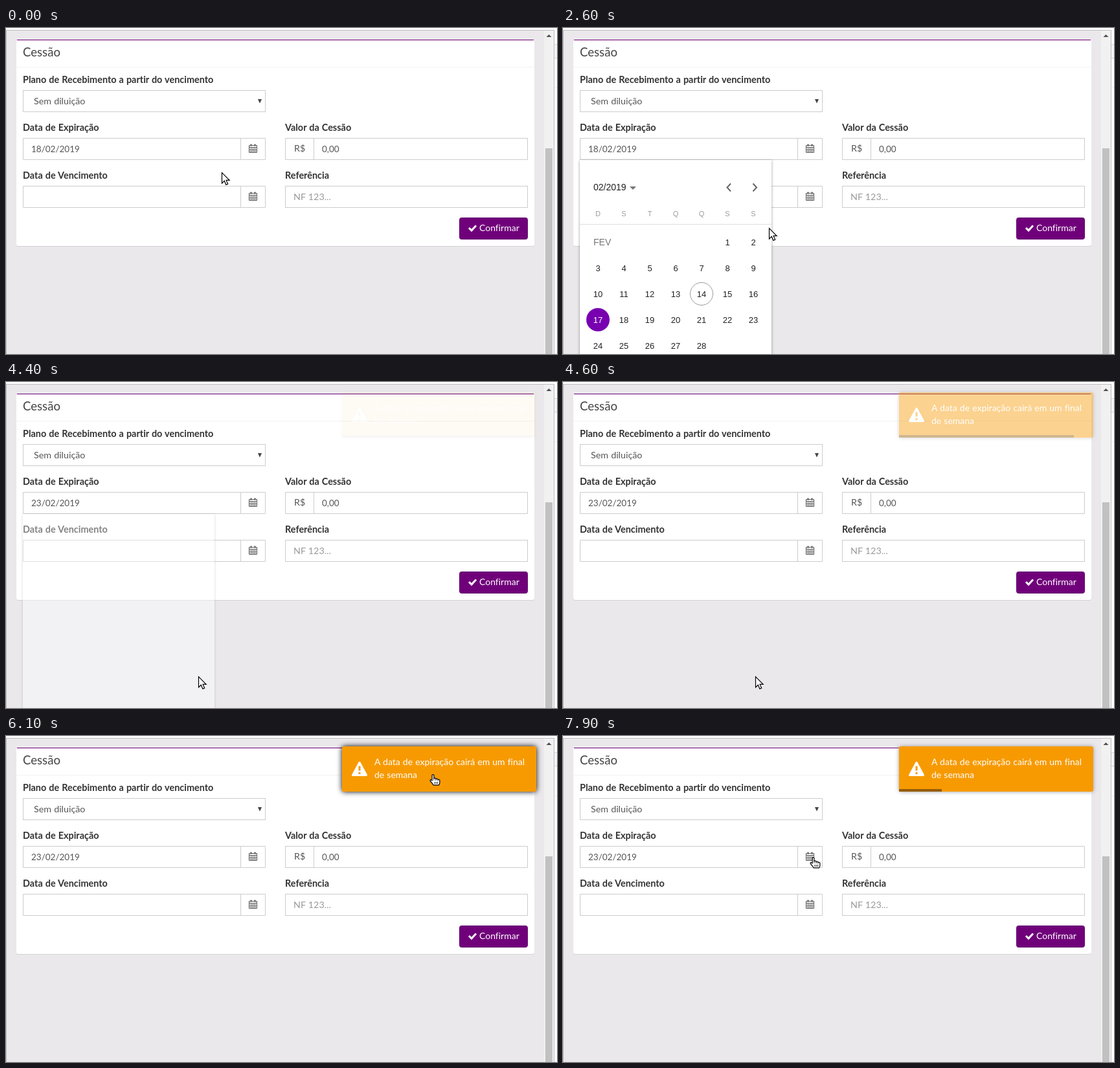
Animation, 851 px wide and 504 px high, one loop 8 s. Source, as an HTML page:

```html
<!DOCTYPE html>
<html lang="pt-BR">
<head>
<meta charset="utf-8">
<title>Cessão</title>
<style>
  html, body { margin: 0; width: 100%; height: 100%; overflow: hidden; background: #fff; }
  #stage { position: relative; width: 851px; height: 504px; overflow: hidden; }
  #stage > * { position: absolute; }
  svg { display: block; overflow: visible; }
  text { font: 14.3px Lato, sans-serif; word-spacing: .5px; font-variant-ligatures: none; fill: #555; }
  .label { font-weight: 700; font-size: 14.45px; fill: #333; }
  .title { font-size: 18.6px; fill: #444; }
  .number { font-size: 13.5px; }
  .light { font-size: 14px; fill: #fff; }
  .field { fill: #fff; stroke: #ccc; }
  #popup { left: 26px; top: 204px; width: 296px; height: 340px; background: #fff;
    transform-origin: 0 0; box-shadow: 0 1px 4px rgba(0,0,0,.4); }
  #popup text { font: 13px "Liberation Sans", Arial, sans-serif; fill: #212121; word-spacing: 0; }
  #popup .mid { text-anchor: middle; }
  #popup .big { font-size: 14px; }
  #popup .week { font-size: 11px; fill: #9c9c9c; }
  #toast { left: 519px; top: 16px; width: 300px; height: 70px; background: #f79a02; border-radius: 3px; }
  #bar { position: absolute; left: 0; bottom: 0; height: 4px; background: #955c08; }
  #cursor { left: 0; top: 0; }
</style>
</head>
<body>
<div id="stage">
  <svg width="851" height="504">
    <defs>
      <g id="calendar" fill="none" stroke="#555">
        <path d="M.5 2.5h12v11h-12zM.5 5.5h12"/>
        <path d="M.5 8.5h12M.5 11h12M3.5 5.5v8M6.5 5.5v8M9.5 5.5v8" stroke-width=".8"/>
        <path d="M3.5 .5v3M9.5 .5v3" stroke-width="2"/>
      </g>
    </defs>
    <rect width="851" height="504" fill="#fff"/>
    <rect y="3" width="847" height="501" fill="#eae8eb"/>
    <path d="M0 3.5H847M.5 3V504M846.5 3V504" stroke="#bdbbbe"/>
    <rect x="847" y="25" width="4" height="21" fill="#f5f5f5"/>
    <path d="M847 25.5h4M847 46.5h4" stroke="#d5d5d5"/>
    <path d="M847 92.5h4" stroke="#eee"/>
    <rect x="831" y="4" width="15" height="500" fill="#f1f1f1"/>
    <rect x="833" y="186" width="11" height="318" fill="#c1c1c1"/>
    <path d="M834.5 14l4-4 4 4z" fill="#505050"/>

    <rect x="16" y="19" width="800" height="319" rx="3" fill="#d3d1d4"/>
    <rect x="16" y="18" width="800" height="319" rx="3" fill="#fff"/>
    <path d="M17 18.5H815" stroke="#70007a"/>
    <path d="M16 60.5H816" stroke="#f4f4f4"/>
    <text class="title" x="26" y="44">Cessão</text>

    <text class="label" x="26" y="85">Plano de Recebimento a partir do vencimento</text>
    <rect class="field" x="26.5" y="96.5" width="374" height="33"/>
    <text x="43" y="118">Sem diluição</text>
    <path d="M389 110h6l-3 6.5z" fill="#444"/>

    <text class="label" x="26" y="159">Data de Expiração</text>
    <path class="field" d="M26.5 170.5h374v33h-374zM362.5 170.5v33"/>
    <text class="number" id="date" x="39" y="192"></text>
    <use href="#calendar" x="375" y="179"/>

    <text class="label" x="431" y="159">Valor da Cessão</text>
    <path class="field" d="M431.5 170.5h374v33h-374zM475.5 170.5v33"/>
    <text x="445" y="191">R$</text>
    <text class="number" x="488" y="192">0,00</text>

    <text class="label" x="26" y="233">Data de Vencimento</text>
    <path class="field" d="M26.5 244.5h374v33h-374zM362.5 244.5v33"/>
    <use href="#calendar" x="375" y="253"/>

    <text class="label" x="431" y="233">Referência</text>
    <rect class="field" x="431.5" y="244.5" width="374" height="33"/>
    <text x="444" y="266" style="fill:#999">NF 123...</text>

    <rect x="700.5" y="293.5" width="105" height="33" rx="3" fill="#70007a" stroke="#640070"/>
    <path d="M715 309l4 4 7-7.5" fill="none" stroke="#fff" stroke-width="3"/>
    <text class="light" x="731" y="314">Confirmar</text>
  </svg>

  <div id="popup">
    <svg id="month" width="296" height="340" viewBox="26 204 296 340">
      <text class="big" x="47" y="251">02/2019</text>
      <path d="M103 245h10l-5 5z" fill="#757575"/>
      <path d="M259 240.5l-5.5 6 5.5 6M293.5 240.5l5.5 6-5.5 6" fill="none" stroke="#666" stroke-width="2"/>
      <path d="M26 303.5h296" stroke="#dedede"/>
      <text class="big" x="47" y="336" style="fill:#757575">FEV</text>
      <circle cx="54" cy="451" r="18" fill="#7800b0"/>
      <circle cx="214" cy="411" r="17.5" fill="none" stroke="#999"/>
    </svg>
  </div>

  <div id="toast">
    <svg width="300" height="66" viewBox="519 16 300 66">
      <path d="M546 41l10.5 19.500h-21z" fill="#fff" stroke="#fff" stroke-width="3" stroke-linejoin="round"/>
      <path d="M546 46.500v7M546 56v3" stroke="#f79a02" stroke-width="3"/>
      <text class="light" x="569" y="45">A data de expiração cairá em um final</text>
      <text class="light" x="569" y="65">de semana</text>
    </svg>
    <div id="bar"></div>
  </div>

  <svg id="cursor" width="24" height="24">
    <path id="arrow" d="M.5 .7V17l3.800-3.600 2.600 6 2.800-1.200-2.600-5.800h5z" fill="#fff" stroke="#000" stroke-width="1.2"/>
    <g id="hand" fill="#fff" stroke="#000" stroke-width="1.2" stroke-linejoin="round">
      <path d="M-.9 9V.8Q-.9-.4 .5-.4T1.900 .8V5.500Q4.500 4.500 5 6.300 7.300 5.500 8 7.200 10.900 6.700 10.900 9V12Q10.900 14 9.500 15.800H1Q-.5 13-3 10.500-4.700 8.300-3.300 7.600-2.200 7.200-.9 9z"/>
      <path d="M1.900 5.500V8.500M5 6.300V9M8 7.200V9.500M3 11v3M5.300 11v3M7.600 11v3" fill="none" stroke-width=".9"/>
    </g>
  </svg>
</div>
<script>
const LOOP = 8000, STEP = 100;
const $ = id => document.getElementById(id);
const [date, popup, month, toast, bar, cursor, arrow, hand] =
  ['date', 'popup', 'month', 'toast', 'bar', 'cursor', 'arrow', 'hand'].map($);

const ramp = (t, from, to) => Math.min(1, Math.max(0, (t - from) / (to - from)));
const easeIn = u => u * u;
const easeOut = u => u * (2 - u);
const easeBoth = u => u * u * (3 - 2 * u);

const origin = { x: 333, y: 223 };
const moves = [
  { from: 400, to: 900, x: 381, y: 192, ease: easeOut },
  { from: 2100, to: 2600, x: 318, y: 309, ease: easeOut },
  { from: 2600, to: 3100, x: 291, y: 407, ease: easeOut },
  { from: 3200, to: 3500, x: 297, y: 455, ease: easeBoth },
  { from: 4600, to: 5400, x: 574, y: 140, ease: easeIn },
  { from: 5400, to: 5800, x: 659, y: 60, ease: easeOut },
  { from: 6900, to: 7200, x: 607, y: 78, ease: easeIn },
  { from: 7200, to: 7900, x: 386, y: 188, ease: easeBoth }
];
// when the pointer rests on something clickable
const handSpans = [[900, 1300], [3100, 3400], [3600, 3900], [6100, 7100], [7900, LOOP]];

function pointer(t) {
  let { x, y } = origin;
  for (const m of moves) {
    const u = m.ease(ramp(t, m.from, m.to));
    x += (m.x - x) * u;
    y += (m.y - y) * u;
  }
  return [Math.round(x), Math.round(y)];
}

function addText(x, y, label, type = '') {
  const el = document.createElementNS('http://www.w3.org/2000/svg', 'text');
  el.setAttribute('x', x);
  el.setAttribute('y', y);
  el.setAttribute('class', 'mid ' + type);
  el.textContent = label;
  month.append(el);
  return el;
}

[...'DSTQQSS'].forEach((d, i) => addText(54 + 40 * i, 291, d, 'week'));
for (let day = 1; day <= 28; day++) {
  const cell = day + 4;
  const el = addText(54 + 40 * (cell % 7), 336 + 40 * Math.floor(cell / 7), day);
  if (day === 17) el.style.fill = '#fff';
}

function draw(time) {
  const t = Math.floor(time / STEP) * STEP;
  const [x, y] = pointer(t);
  const isHand = handSpans.some(([from, to]) => t >= from && t < to);
  cursor.style.transform = `translate(${x}px, ${y}px)`;
  arrow.style.display = isHand ? 'none' : '';
  hand.style.display = isHand ? '' : 'none';

  const open = ramp(t, 1200, 1311);
  const picked = t >= 4400;
  popup.style.opacity = open - ramp(t, 4340, 4440);
  popup.style.transform = `scaleY(${.78 + .22 * open})`;
  month.style.visibility = picked ? 'hidden' : 'visible';
  date.textContent = picked ? '23/02/2019' : '18/02/2019';

  // hovering hides the countdown, leaving restarts a shorter one
  const hovered = t >= 5600 && t < 7100;
  const left = 1 - (t < 5600 ? ramp(t, 4350, 6850) : ramp(t, 7172, 8105));
  toast.style.opacity = ramp(t, 4380, 4880);
  toast.style.boxShadow = hovered ? '0 0 8px #000' : '0 0 6px #999';
  bar.style.width = hovered ? 0 : 300 * left + 'px';
}

const start = performance.now();
function tick() {
  draw((performance.now() - start) % LOOP);
  requestAnimationFrame(tick);
}
tick();
</script>
</body>
</html>
```
